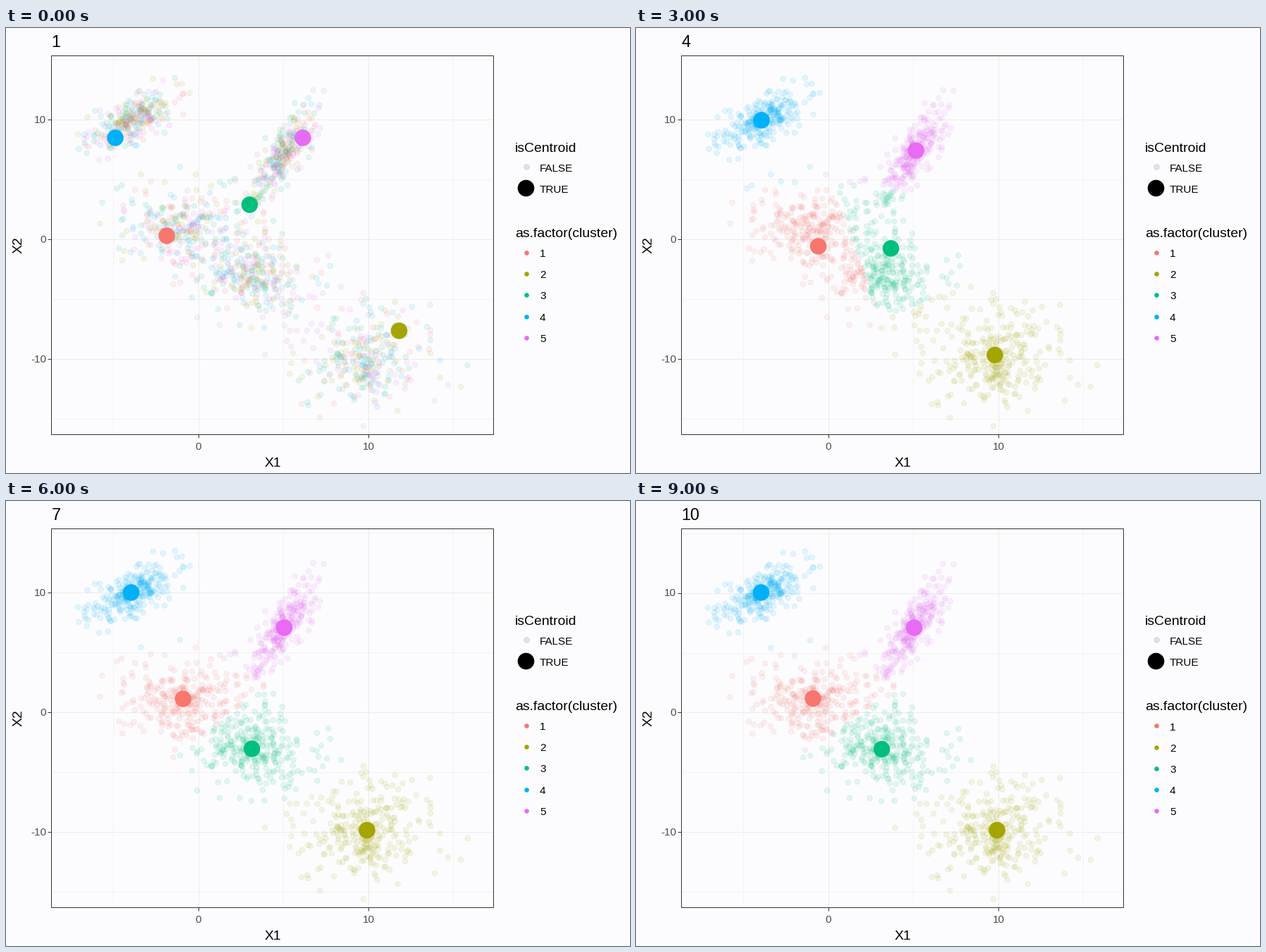
Write a matplotlib script that moves like this. It is 885x632 px and loops after 10000 ms.

```python
import numpy as np
import matplotlib
import matplotlib.pyplot as plt
from matplotlib.animation import FuncAnimation
from matplotlib.colors import to_rgba

matplotlib.rcParams["font.family"] = "Liberation Sans"

W, H, DPI = 885, 632, 100
PT = 72 / DPI
LEFT, RIGHT, TOP, BOTTOM = 64.9, 691.8, 38.5, 576.8
BASE, SMALL, BIG = 19.4, 15.3, 23.2
BG = "#fcfcfe"
COLORS = ["#f8766d", "#a3a500", "#00bf7d", "#00b0f6", "#e76bf3"]
ALPHA = 0.1
UNIT = np.array([24.13, 17])    # pixels per data unit
ORIGIN = np.array([273, 299.4])

# Centroids in pixels at four moments: first, after one step, midway, settled.
FIRST = np.array([(228, 295), (557.5, 430), (345.5, 251), (155, 156), (421, 156)])
SECOND = np.array([(262.5, 315), (501, 458), (354, 280), (177.5, 130), (403.5, 163)])
MIDWAY = np.array([(258.5, 310), (509, 464.5), (361.5, 313), (178, 131), (397, 174)])
SETTLED = np.array([(251, 280.5), (512, 467.5), (348.5, 352.5), (177.5, 130), (394.5, 180)])

# count, mean x, mean y, sd x, sd y, correlation, in data units
BLOBS = [
    (275, -3.9, 10.0, 1.35, 1.3, 0.62),
    (280, 5.0, 7.0, 1.0, 2.2, 0.8),
    (280, -0.9, 1.1, 2.0, 1.8, 0.0),
    (290, 3.1, -3.1, 1.95, 1.8, 0.0),
    (260, 9.9, -9.8, 2.3, 2.2, 0.0),
    (40, 9.9, -11.0, 0.45, 0.9, 0.0),
]


def to_px(x, y):
    return ORIGIN + np.column_stack((x, np.negative(y))) * UNIT


def blob(rng, n, mx, my, sx, sy, rho):
    """Correlated normal cloud with a dense core and a thin rim."""
    u, v = rng.standard_normal((2, 2 * n)) * rng.uniform(0.5, 1.4, 2 * n)
    keep = np.hypot(u, v) < 2.75
    u, v = u[keep][:n], v[keep][:n]
    v = rho * u + np.sqrt(1 - rho ** 2) * v
    return to_px(mx + sx * u, my + sy * v)


def make_points():
    rng = np.random.default_rng(12)
    pts = np.vstack([blob(rng, *b) for b in BLOBS])
    rng.shuffle(pts)
    return pts, rng.integers(0, 5, len(pts))


def centers(step):
    """One jump, two even steps, then a cubic ease-out to rest."""
    if step == 0:
        return FIRST
    if step <= 3:
        return SECOND + (MIDWAY - SECOND) * (step - 1) / 2
    left = max(0, 1 - (step - 3) / 4) ** 3
    return SETTLED + (MIDWAY - SETTLED) * left


def cluster_of(step):
    """Each point takes the nearest centroid of the step before."""
    if step == 0:
        return start
    gap = (points[:, None] - centers(step - 1)) / UNIT
    return (gap ** 2).sum(axis=2).argmin(axis=1)


def squeeze(y, drop):
    """Lower the panel's top by drop while its bottom stays."""
    return BOTTOM - (BOTTOM - y) * (1 - drop / (BOTTOM - TOP))


fig = plt.figure(figsize=((W + 1e-6) / DPI, (H + 1e-6) / DPI), dpi=DPI, facecolor=BG)
ax = fig.add_axes([0, 0, 1, 1])
ax.set_xlim(0, W)
ax.set_ylim(H, 0)
ax.axis("off")


def text(x, y, s, size, color="black", **kw):
    return ax.text(x, y, s, fontsize=size * PT, color=color, **kw)


def line(xs, ys, color, z=1):
    # The half pixel offsets make snapping pick the pixel that holds the line.
    return ax.plot(np.array(xs) - 0.5, np.array(ys) + 0.5, color=color, lw=PT,
                   zorder=z, solid_capstyle="butt", solid_joinstyle="miter")[0]


def dots(xy, diameter, color, z, edge=0.0):
    xy = np.atleast_2d(xy)
    return ax.scatter(xy[:, 0], xy[:, 1], s=(diameter * PT) ** 2, c=color,
                      linewidths=edge * PT, zorder=z)


points, start = make_points()
faint = np.array([to_rgba(c, ALPHA) for c in COLORS])

# Grid, ticks and tick labels
y_lines = []
for v in range(-15, 16, 5):
    x, y = ORIGIN + np.array([v, -v]) * UNIT
    major = v % 10 == 0
    color = "#ebebeb" if major else "#f2f2f3"
    if v >= -5:
        line([x, x], [TOP, BOTTOM], color)
    y_lines.append((line([LEFT, RIGHT], [y, y], color), y))
    if major:
        y_lines.append((line([LEFT - 5, LEFT], [y, y], "#333333"), y))
        text(57, y + 5.6, str(v), SMALL, "#4d4d4d", ha="right")
        if v >= 0:
            line([x, x], [BOTTOM, BOTTOM + 5], "#333333")
            text(x, 598.5, str(v), SMALL, "#4d4d4d", ha="center")

line([LEFT, RIGHT, RIGHT, LEFT, LEFT], [TOP, TOP, BOTTOM, BOTTOM, TOP], "#333333", 5)
text(378, 623, "X1", BASE, ha="center")
text(18, 308, "X2", BASE, rotation=90, ha="center", va="center")
title = text(64.5, 27, "1", BIG)

# Legends
text(722, 175.5, "isCentroid", BASE)
dots((737.5, 197.3), 7.6, [(0, 0, 0, ALPHA)], 3, 1)
dots((737.2, 227.1), 23.6, "black", 3)
text(757, 203.5, "FALSE", SMALL)
text(757, 233.5, "TRUE", SMALL)
text(722, 297, "as.factor(cluster)", BASE)
legend_parts = []
for k, c in enumerate(COLORS):
    y = 319 + 30.2 * k
    dot = dots((737.5, y), 6.6, c, 3)
    label = text(757, y + 6, str(k + 1), SMALL)
    legend_parts.append((dot, label, y))

cloud = dots(points, 7.6, faint[start], 2, 1)
heads = dots(FIRST, 23.5, COLORS, 4)


def draw(step):
    name = str(step + 1)
    # Round digits reach below the baseline and push the panel down a little.
    drop = 1.0 if set(name) & set("035689") else 0.0
    title.set_text(name)
    for grid, y in y_lines:
        grid.set_ydata([squeeze(y, drop) + 0.5] * 2)
    for dot, label, y in legend_parts:
        dot.set_offsets([(737.5, y + drop / 2)])
        label.set_y(y + 6 + drop / 2)
    colors = faint[cluster_of(step)]
    cloud.set_offsets(np.column_stack((points[:, 0], squeeze(points[:, 1], drop))))
    cloud.set_facecolor(colors)
    cloud.set_edgecolor(colors)
    heads.set_offsets(centers(step))
    return []


anim = FuncAnimation(fig, draw, frames=10, interval=1000, repeat=True,
                     repeat_delay=0, blit=False)
plt.show()
```
